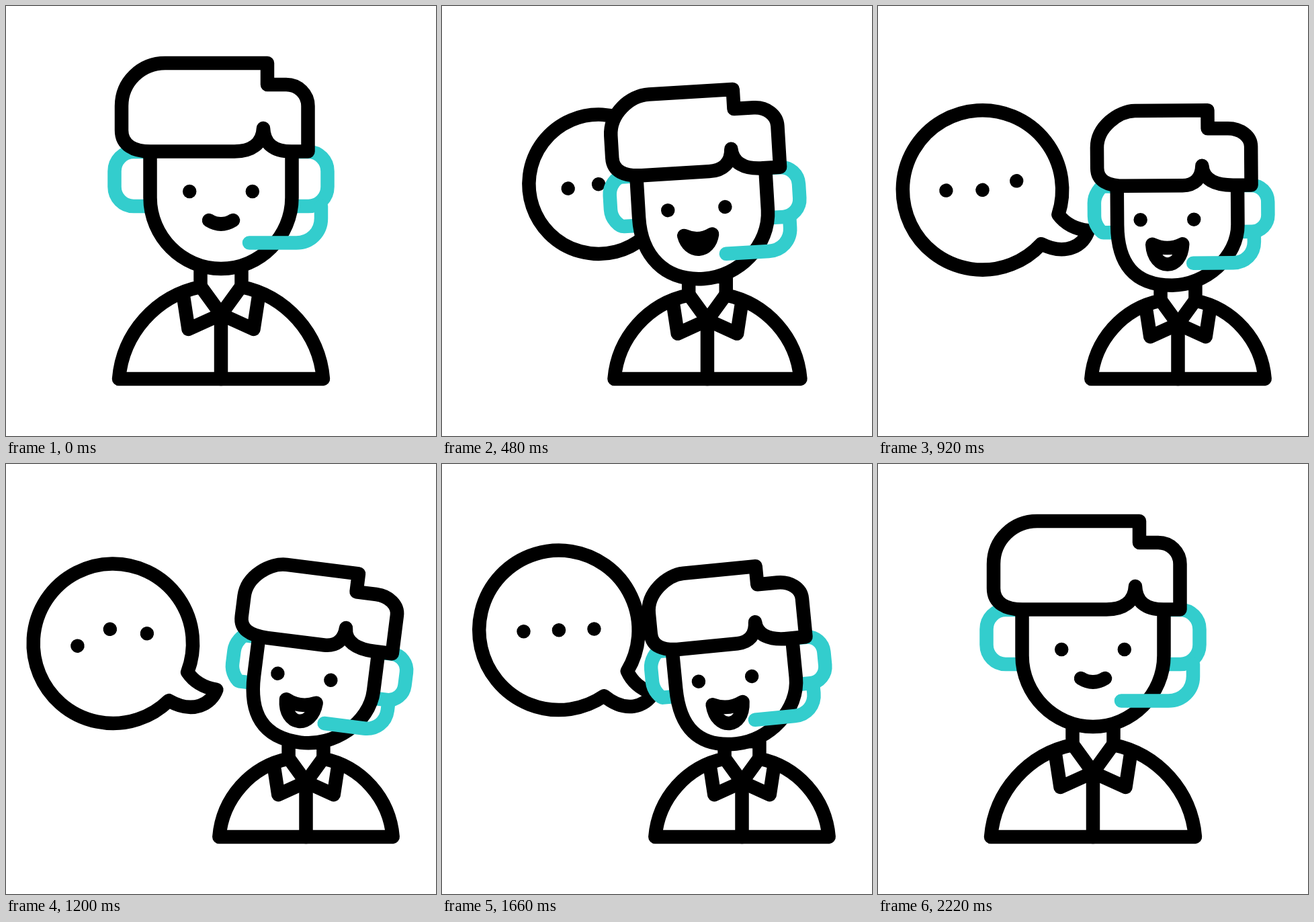
Write an HTML page with a canvas that moves like this. It is 640 px wide and 640 px high and loops after 2400 ms.

```html
<!DOCTYPE html>
<html lang="en">
<head>
<meta charset="utf-8">
<title>Support agent</title>
<style>
  html, body { margin: 0; width: 100%; height: 100%; overflow: hidden; background: #fff; }
  canvas { display: block; width: 640px; height: 640px; }
</style>
</head>
<body>
<canvas id="stage" width="640" height="640"></canvas>
<script>
const ctx = document.getElementById('stage').getContext('2d');
const LOOP = 2400, BLACK = '#000', TEAL = '#33cdcd';

// Keys are [time, value] pairs, eased in and out between neighbours.
const MOVE = [[200, 0], [700, 1], [1700, 1], [2200, 0]];
const TILT = [[200, 0], [700, -5.8], [1200, 7.2], [1700, -5.8], [2200, 0]];
const SWING = [[700, 0], [950, -22.6], [1200, -18.7], [1500, 2.6], [1700, -10.1], [2200, -15.5]];

const mix = (a, b, k) => a + (b - a) * k;
const ease = u => u * u * (3 - 2 * u);

function at(keys, t) {
  if (t <= keys[0][0]) return keys[0][1];
  for (let i = 1; i < keys.length; i++) {
    const [t0, a] = keys[i - 1], [t1, b] = keys[i];
    if (t < t1) return mix(a, b, ease((t - t0) / (t1 - t0)));
  }
  return keys[keys.length - 1][1];
}

// The path is transformed first, so line weight stays constant.
function draw(m, d, color = BLACK, fill = false) {
  const path = new Path2D();
  path.addPath(new Path2D(d), m);
  if (fill) {
    ctx.fillStyle = '#fff';
    ctx.fill(path);
  }
  ctx.strokeStyle = color;
  ctx.stroke(path);
}

const dot = (m, x, y) => draw(m, `M${x},${y}h.01`);

function bubble(t, p) {
  const x = mix(315, 189.8, p) - 32 * p * (1 - p);
  const y = mix(280, 231.8, p) + 57 * p * (1 - p);
  const m = new DOMMatrix()
    .translate(282, 342).rotate(at(SWING, t)).translate(-282, -342)
    .translate(x, y).rotate(mix(-29.6, 6.8, p)).scale(mix(.69, 1, p));
  draw(m, 'M63.7,100.2A118.7 118.7 0 1 1 99.6,64.6Q109,88 136.5,99C125,118 95,128 63.7,100.2Z', BLACK, true);
  for (let i = 0; i < 3; i++) {
    const u = Math.min(1, Math.max(0, (t - 768 - 178 * i) / 540));
    dot(m, (i - 1) * 52.5, -22 * Math.sin(Math.PI * u) ** 2);
  }
}

function body(m) {
  draw(m, 'M168,555A153 153 0 0 1 289.5,418V388H350.5V418A153 153 0 0 1 472,555Z', BLACK, true);
  draw(m, 'M320,458V555');
  for (const side of [1, -1]) {
    const half = m.translate(320, 0).scale(side, 1);
    draw(half, 'M30.5,417L0,459L48.5,481L56,432');
  }
}

function hair(m, p) {
  // Turning the head slides the middle of the hair left.
  const slide = x => x < 200 ? 8 : x < 389 ? 10 - .2 * (x - 237) : (x - 449) / 4;
  const X = x => x + p * slide(x);
  draw(m, `M${X(237)},85H${X(389)}V117H${X(417)}
    C${X(435)},117 ${X(449.5)},131 ${X(449.5)},149V216.5H${X(425)}
    C${X(398)},216.5 ${X(384)},205 ${X(383)},182
    C${X(382)},205 ${X(365)},216.5 ${X(340)},216.5H${X(215)}
    C${X(190)},216.5 ${X(172)},207 ${X(172)},185V149
    C${X(172)},113 ${X(201)},85 ${X(237)},85Z`, BLACK, true);
}

function head(m, p) {
  const ear = 161.5 + 13 * p, bend = ear + 12.5;
  draw(m, `M214,217H190C${bend},217 ${ear},230 ${ear},246V269C${ear},285 ${bend},298 190,298H214`, TEAL, true);
  draw(m, 'M426,217H450C466,217 478.5,230 478.5,246V269C478.5,285 466,298 450,298H426', TEAL, true);

  draw(m, `M214.5,217V285C214.5,${343 + 8 * p} ${262 - 20 * p},391 ${320 - 10 * p},391
    C${378 - 10 * p},391 425.5,343 425.5,285V217`, BLACK, true);
  hair(m, p);

  const face = m.translate(320 - 18 * p, 0);
  dot(face, -46.8, 276);
  dot(face, 46.8, 276);

  const w = mix(18, 26.5, p), q = mix(6, 24, p), h = mix(7.3, 47, p);
  draw(face.translate(0, 319), `M${-w},0Q0,${mix(11, 13, p)} ${w},0C${q},${h} ${-q},${h} ${-w},0Z`, BLACK, true);

  const mic = m.translate(-15 * p, 0);
  draw(mic, 'M469,298V316C469,337 453,352.5 432,352.5H362', TEAL);
}

function frame() {
  const t = performance.now() % LOOP;
  const p = at(MOVE, t);
  const m = new DOMMatrix()
    .translate(320 + 126.5 * p, 555).scale(1 - .15 * p).translate(-320, -555);
  ctx.fillStyle = '#fff';
  ctx.fillRect(0, 0, 640, 640);
  ctx.lineWidth = 20.5;
  ctx.lineJoin = ctx.lineCap = 'round';
  if (p > 0) bubble(t, p);
  body(m);
  head(m.translate(320, 394).rotate(at(TILT, t)).translate(-320, -394), p);
  requestAnimationFrame(frame);
}
frame();
</script>
</body>
</html>
```
